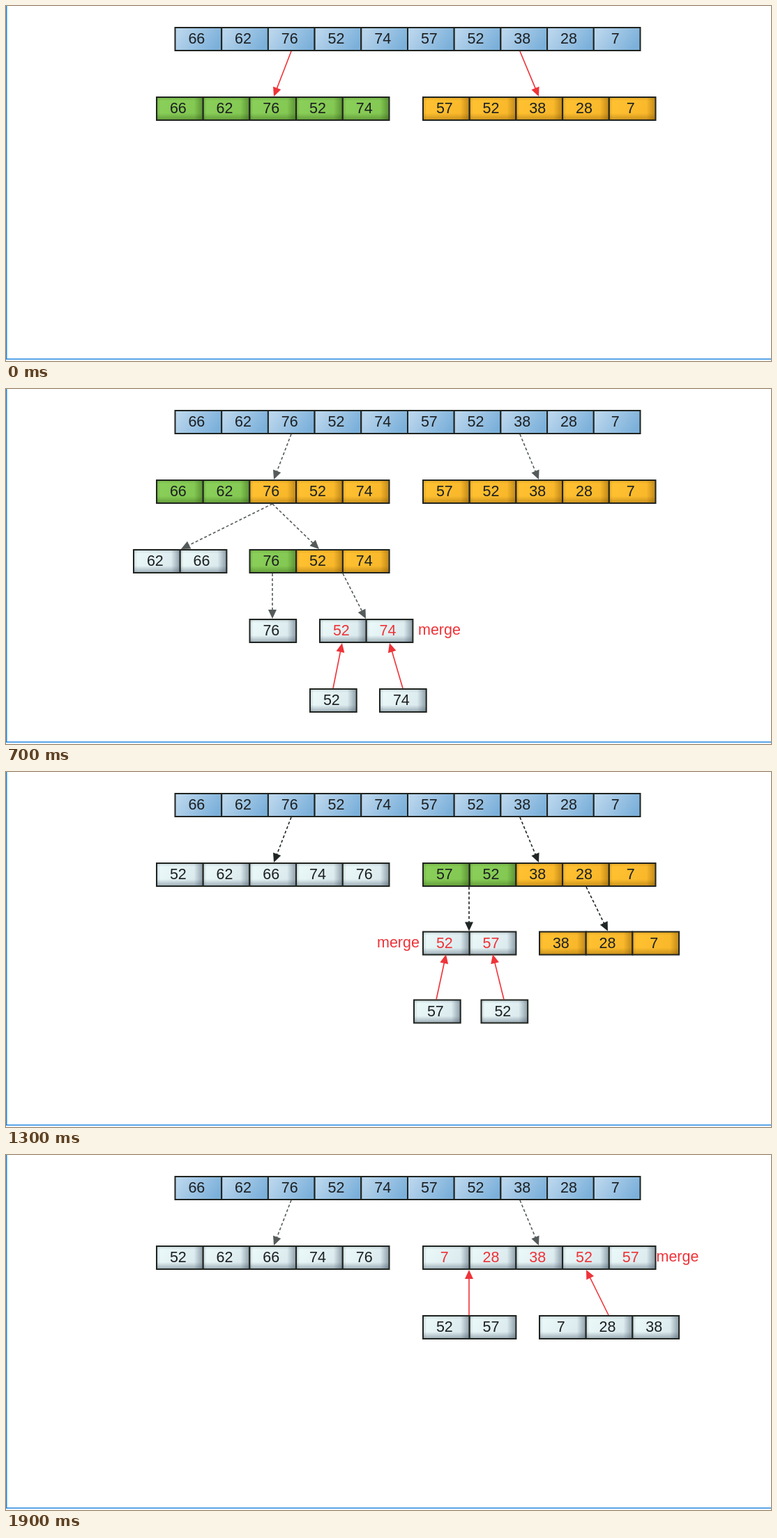
These frames come from a looping animation (1097 px wide and 510 px high, 2 s). An HTML page with a canvas:

```html
<!DOCTYPE html>
<html lang="en">
<head>
<meta charset="utf-8">
<title>Merge sort</title>
<style>
html, body { margin: 0; width: 100%; height: 100%; overflow: hidden; background: #fff; }
canvas { display: block; }
</style>
</head>
<body>
<canvas id="stage" width="1097" height="510"></canvas>
<script>
(() => {
const ctx = document.getElementById('stage').getContext('2d');
const CELL = 66.7, H = 33, RED = '#ee3338';
const FONT = '21.5px Arial, "Liberation Sans", sans-serif';
const FILL = {
  b: ['#b9d5ec', '#7bb0da'],
  g: ['#8acf59', '#82c751'],
  o: ['#ffc131', '#f8b629'],
  w: ['#eaf8f8', '#d9e8ec']
};
let ink = '#555b5b';

function shade(x, y, x0, y0, x1, y1, alpha, tone) {
  const g = ctx.createLinearGradient(x + x0, y + y0, x + x1, y + y1);
  g.addColorStop(0, `rgba(${tone},0)`);
  g.addColorStop(1, `rgba(${tone},${alpha})`);
  ctx.fillStyle = g;
  ctx.fillRect(x, y, CELL, H);
}

function cell(x, y, text, kind) {
  const red = kind === 'r', key = red ? 'w' : kind;
  const g = ctx.createLinearGradient(x + 10, y, x + CELL - 10, y + H);
  FILL[key].forEach((c, i) => g.addColorStop(i, c));
  ctx.fillStyle = g;
  ctx.fillRect(x, y, CELL, H);
  if (key !== 'b') {
    const tone = key === 'w' ? '70,88,105' : key === 'g' ? '35,70,10' : '110,70,0';
    const k = key === 'w' ? 1.25 : 1;
    shade(x, y, CELL - 13, 0, CELL, 0, 0.42 * k, tone);
    shade(x, y, 0, H - 10, 0, H, 0.36 * k, tone);
    shade(x, y, 5, 0, 0, 0, 0.22, tone);
    shade(x, y, 0, 5, 0, 0, 0.2, tone);
  }
  ctx.strokeStyle = '#20241f';
  ctx.lineWidth = 2;
  ctx.strokeRect(x, y, CELL, H);
  ctx.fillStyle = red ? RED : '#1d2022';
  ctx.textAlign = 'center';
  ctx.fillText(text, x + CELL / 2 - 2.5, y + 23);
}

// The last kind repeats for the remaining cells.
function row(x, y, values, kinds) {
  values.split(' ').forEach((v, i) =>
    cell(x + i * CELL, y, v, kinds[Math.min(i, kinds.length - 1)]));
}

function arrow(x0, y0, x1, y1, color, dashed) {
  const a = Math.atan2(y1 - y0, x1 - x0), len = Math.hypot(x1 - x0, y1 - y0);
  ctx.save();
  ctx.translate(x0, y0);
  ctx.rotate(a);
  ctx.strokeStyle = ctx.fillStyle = color;
  ctx.lineWidth = 1.6;
  ctx.setLineDash(dashed ? [4, 3] : []);
  ctx.beginPath();
  ctx.moveTo(0, 0);
  ctx.lineTo(len - 12, 0);
  ctx.stroke();
  ctx.beginPath();
  ctx.moveTo(len, 0);
  ctx.lineTo(len - 13, -6);
  ctx.lineTo(len - 13, 6);
  ctx.fill();
  ctx.restore();
}
const hot = (...p) => arrow(...p, RED, false);
const old = (...p) => arrow(...p, ink, true);

function merge(x, y) {
  ctx.fillStyle = RED;
  ctx.textAlign = 'left';
  ctx.fillText('merge', x, y);
}

function halves(link, left, leftKinds, right, rightKinds) {
  row(242.5, 31, '66 62 76 52 74 57 52 38 28 7', 'b');
  row(216, 131, left, leftKinds);
  row(598, 131, right, rightKinds);
  link(409, 65, 384, 130);
  link(737, 65, 764, 130);
}

const leftActive = () => halves(old, '66 62 76 52 74', 'ggo', '57 52 38 28 7', 'o');
const rightActive = () => halves(old, '52 62 66 74 76', 'w', '57 52 38 28 7', 'ggo');

function splitLeft(link, dx) {
  leftActive();
  link(382, 165, 251 + dx, 230);
  link(382, 165, 449 + dx, 230);
}

function pairLeft(done) {
  splitLeft(old, -2);
  row(181, 231, done ? '62 66' : '66 62', done ? 'r' : 'go');
  row(348, 231, '76 52 74', 'o');
  row(151, 315, '66', 'w');
  row(251, 315, '62', 'w');
  if (done) {
    hot(185, 314, 214, 265);
    hot(284, 314, 281, 265);
    merge(182, 218);
  } else {
    hot(214, 264, 185, 314);
    hot(281, 264, 284, 314);
  }
}

function tripleLeft(link, pair, kinds) {
  splitLeft(old, 0);
  row(183, 231, '62 66', 'w');
  row(349.5, 231, '76 52 74', 'goo');
  row(349.5, 331, '76', 'w');
  row(450, 331, pair, kinds);
  link(382, 265, 382, 330);
  link(483, 265, 516, 330);
}

function leavesLeft() {
  row(436, 431, '52', 'w');
  row(536, 431, '74', 'w');
}

function splitRight(link, y, pair, kinds, tripleKinds) {
  rightActive();
  row(598, y, pair, kinds);
  row(765, y, '38 28 7', tripleKinds);
  link(664, 165, 664, y - 1);
  link(832, 165, 863, y - 1);
}

function tripleRight(link, pair, kinds) {
  splitRight(old, 231, '52 57', 'w', 'goo');
  row(765, 328, '38', 'w');
  row(865, 328, pair, kinds);
  link(797, 264, 797, 327);
  link(899, 264, 930, 327);
}

function leavesRight() {
  row(851.5, 426, '28', 'w');
  row(951.5, 426, '7', 'w');
}

const scenes = {
  0() { halves(hot, '66 62 76 52 74', 'g', '57 52 38 28 7', 'o'); },
  100() {
    splitLeft(hot, 0);
    row(183, 231, '66 62', 'g');
    row(349.5, 231, '76 52 74', 'o');
  },
  300() { pairLeft(false); },
  400() { pairLeft(true); },
  500() { tripleLeft(hot, '52 74', 'o'); },
  600() {
    tripleLeft(old, '52 74', 'go');
    leavesLeft();
    hot(482, 364, 469, 430);
    hot(550, 364, 569, 430);
  },
  700() {
    tripleLeft(old, '52 74', 'r');
    leavesLeft();
    hot(469, 430, 482, 365);
    hot(569, 430, 550, 365);
    merge(591, 353);
  },
  900() {
    splitLeft(old, 0);
    row(183, 231, '62 66', 'w');
    row(349.5, 231, '52 74 76', 'r');
    row(349.5, 331, '76', 'w');
    row(450, 331, '52 74', 'w');
    hot(382, 330, 382, 265);
    hot(516, 330, 483, 265);
    merge(557, 253);
  },
  1000() {
    halves(old, '52 62 66 74 76', 'r', '57 52 38 28 7', 'o');
    row(183, 231, '62 66', 'w');
    row(349.5, 231, '52 74 76', 'w');
    hot(249, 230, 282, 165);
    hot(449, 230, 449, 165);
    merge(146, 153);
  },
  1100() { splitRight(hot, 231, '57 52', 'g', 'o'); },
  1200() {
    splitRight(old, 229.5, '57 52', 'go', 'o');
    row(585, 327.5, '57', 'w');
    row(681.5, 327.5, '52', 'w');
    hot(631, 262, 617, 327);
    hot(698, 262, 714, 327);
  },
  1300() {
    ink = '#202626';
    splitRight(old, 229.5, '52 57', 'r', 'o');
    row(585, 327.5, '57', 'w');
    row(681.5, 327.5, '52', 'w');
    hot(617, 327, 631, 262);
    hot(714, 327, 698, 262);
    merge(532, 252);
  },
  1400() { tripleRight(hot, '28 7', 'o'); },
  1500() {
    tripleRight(old, '28 7', 'go');
    leavesRight();
    hot(898, 361, 884, 425);
    hot(965, 361, 984, 425);
  },
  1600() {
    tripleRight(old, '7 28', 'r');
    leavesRight();
    hot(884, 425, 898, 361);
    hot(984, 425, 965, 361);
    merge(1006, 350);
  },
  1700() {
    rightActive();
    row(598, 231, '52 57', 'w');
    row(765, 231, '7 28 38', 'r');
    row(765, 328, '38', 'w');
    row(865, 328, '7 28', 'w');
    old(664, 165, 664, 230);
    old(832, 165, 863, 230);
    hot(797, 327, 797, 265);
    hot(930, 327, 899, 265);
    merge(972, 253);
  },
  1900() {
    halves(old, '52 62 66 74 76', 'w', '7 28 38 52 57', 'r');
    row(598, 231, '52 57', 'w');
    row(765, 231, '7 28 38', 'w');
    hot(664, 230, 664, 165);
    hot(864, 230, 832, 165);
    merge(932.5, 153);
  }
};
const times = Object.keys(scenes).map(Number);

function draw(t) {
  ink = '#555b5b';
  ctx.fillStyle = '#fff';
  ctx.fillRect(0, 0, 1097, 510);
  ctx.fillStyle = '#2588e0';
  ctx.fillRect(0, 0, 1.5, 508);
  ctx.fillRect(0, 506.5, 1097, 1.5);
  ctx.font = FONT;
  scenes[times.filter(s => s <= t).pop()]();
}

let start;
function tick(now) {
  start ??= now;
  draw(Math.max(0, now - start) % 2000);
  requestAnimationFrame(tick);
}
draw(0);
requestAnimationFrame(tick);
})();
</script>
</body>
</html>
```
